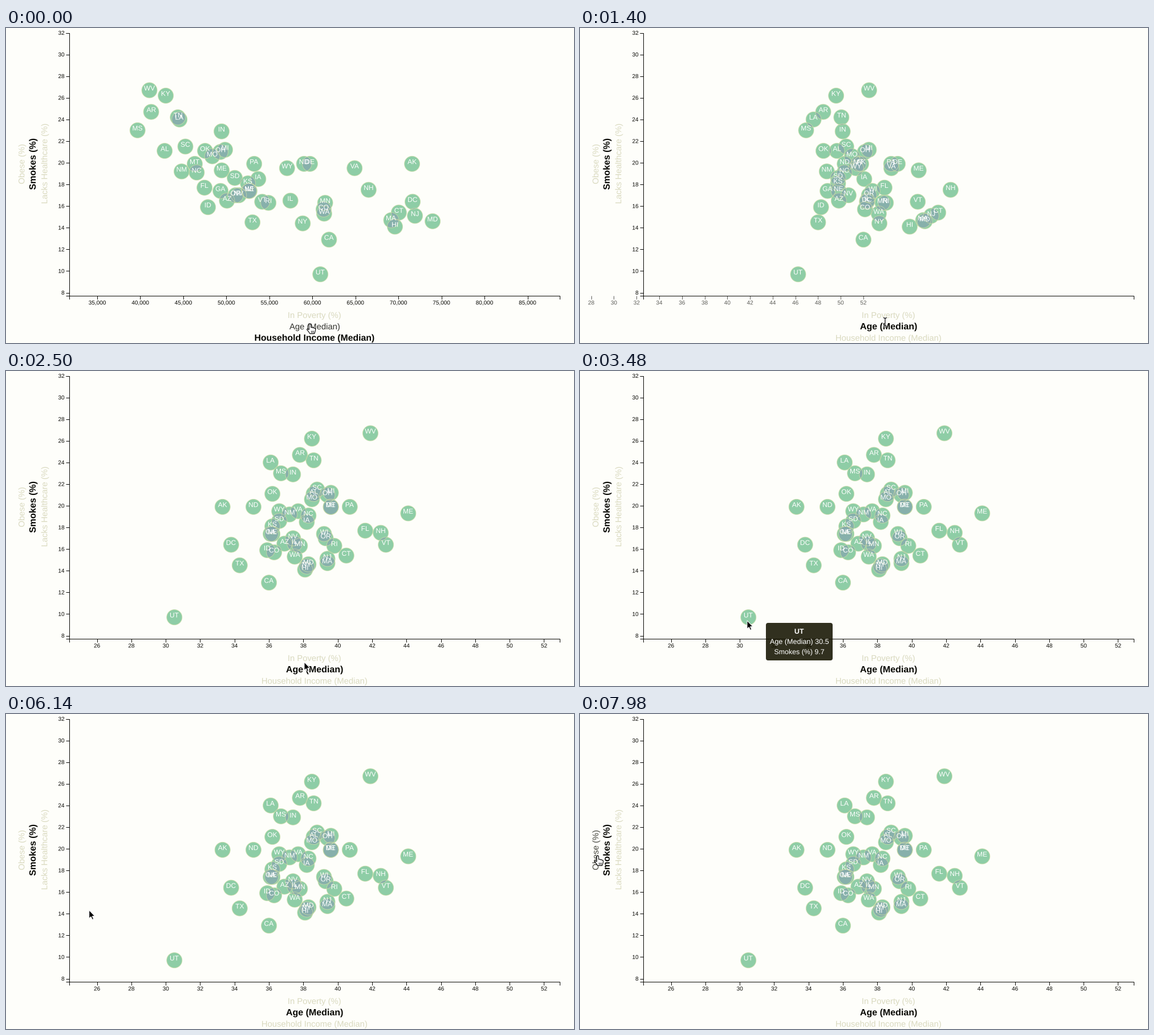
These frames come from a looping animation (996 by 554 pixels, 8 s). A matplotlib script:

```python
import matplotlib.pyplot as plt
import numpy as np
from matplotlib.animation import FuncAnimation
from matplotlib.collections import PolyCollection
from matplotlib.patches import FancyBboxPatch, PathPatch
from matplotlib.path import Path
from matplotlib.textpath import TextPath

W, H, DPI = 996, 554, 64
PX = 72 / DPI
STEP, LOOP = 20, 8000
R = 13.5
INK, FADED, HOVER = (np.array(c) / 255 for c in
                     ((8, 8, 4), (218, 218, 192), (52, 52, 48)))

STATES = ("AL AK AZ AR CA CO CT DE DC FL GA HI ID IL IN IA KS KY LA ME MD MA MI "
          "MN MS MO MT NE NV NH NJ NM NY NC ND OH OK OR PA RI SC SD TN TX UT VT "
          "VA WA WV WI WY").split()
INCOME = np.array([
    42830, 71583, 50068, 41262, 61933, 61303, 70048, 59716, 71648, 47463, 49321,
    69592, 47861, 57444, 49446, 53712, 52504, 42958, 44555, 49462, 73971, 69160,
    49847, 61481, 39680, 48363, 46328, 52686, 51450, 66532, 71919, 44803, 58878,
    46556, 59029, 49308, 47529, 51075, 53234, 54891, 45238, 50979, 44361, 53035,
    60922, 54166, 64902, 61366, 41059, 52622, 57055])
AGE = np.array([
    38.6, 33.3, 36.9, 37.8, 36, 36.3, 40.5, 39.6, 33.8, 41.6, 36.1,
    38.1, 35.9, 37.5, 37.4, 38.2, 36.2, 38.5, 36.1, 44.1, 38.3, 39.4,
    39.6, 37.8, 36.7, 38.5, 39.6, 36.2, 37.4, 42.5, 39.4, 37.2, 38.2,
    38.3, 35.1, 39.4, 36.2, 39.3, 40.7, 39.8, 38.8, 36.6, 38.6, 34.3,
    30.5, 42.8, 37.7, 37.5, 41.9, 39.2, 36.6])
SMOKES = np.array([
    21.1, 19.9, 16.5, 24.7, 12.9, 15.7, 15.4, 19.9, 16.4, 17.7, 17.4,
    14.1, 15.9, 16.5, 22.9, 18.5, 18.1, 26.2, 24, 19.3, 14.6, 14.7,
    21.2, 16.3, 23, 20.6, 19.9, 17.4, 17, 17.5, 15.1, 19.2, 14.4,
    19.1, 19.9, 21, 21.1, 17, 19.9, 16.3, 21.5, 18.6, 24.2, 14.5,
    9.7, 16.4, 19.5, 15.3, 26.7, 17.4, 19.5])


def income_x(v):
    return 235.5 + (np.asarray(v) - 40000) * 0.015089


def age_x(v):
    return 159.6 + (np.asarray(v) - 26) * 30.15


def smokes_y(v):
    return 465.5 - (np.asarray(v) - 8) * 19.04


fig = plt.figure(figsize=(W / DPI, H / DPI), dpi=DPI, facecolor="#fefefa")
ax = fig.add_axes([0, 0, 1, 1])
ax.set_xlim(0, W)
ax.set_ylim(H, 0)
ax.axis("off")
layer = iter(range(1, 1000))


def add_path(path, color, fill=True, width=1.0, edge=None):
    patch = PathPatch(path, facecolor=color if fill else "none",
                      edgecolor=edge or ("none" if fill else color),
                      linewidth=0 if fill and not edge else width * PX,
                      capstyle="butt", zorder=next(layer))
    ax.add_patch(patch)
    return patch


def glyphs(text, size, bold=False, anchor=0.5):
    prop = {"family": "Liberation Sans", "weight": "bold" if bold else "normal"}
    p = TextPath((0, 0), text, size=size, prop=prop)
    v = np.array(p.vertices) * [1, -1]
    ink = v[p.codes != Path.CLOSEPOLY, 0]
    v[:, 0] -= ink.min() + np.ptp(ink) * anchor
    return v, np.array(p.codes)


def add_text(text, x, y, size, color=INK, bold=False, anchor=0.5, upright=False):
    v, codes = glyphs(text, size, bold, anchor)
    if upright:
        v = np.column_stack([v[:, 1], -v[:, 0]])
    patch = add_path(Path(v + [x, y], codes), color)
    patch.set_snap(False)
    return patch


class TextRow:
    """Many short centred strings drawn as one shape."""

    def __init__(self, texts, size, color):
        parts = [glyphs(t, size) for t in texts]
        self.verts = np.concatenate([v for v, _ in parts])
        self.codes = np.concatenate([c for _, c in parts])
        self.owner = np.repeat(np.arange(len(parts)), [len(v) for v, _ in parts])
        self.patch = add_path(Path(self.verts, self.codes), color)
        self.patch.set_snap(False)

    def place(self, x, y):
        at = np.column_stack([x, np.broadcast_to(y, np.shape(x))])
        self.patch.set_path(Path(self.verts + at[self.owner], self.codes))


def segments(starts, ends):
    pts = np.stack([starts, ends], 1).reshape(-1, 2)
    return Path(pts, [Path.MOVETO, Path.LINETO] * len(starts))


# Bubbles
def add_polys(**style):
    polys = PolyCollection([], zorder=next(layer), **style)
    ax.add_collection(polys)
    return polys


fills = add_polys(facecolor="#8ecda6", edgecolor="none", linewidth=0)
lenses = add_polys(facecolor="#86abac", edgecolor="none", linewidth=0, alpha=0.85)
rims = add_polys(facecolor="none", edgecolor="#cfdfa6", linewidth=PX, alpha=0.7)
names = TextRow(STATES, 12, "white")

TURN = np.linspace(0, 2 * np.pi, 48, endpoint=False)
RING = R * np.column_stack([np.cos(TURN), np.sin(TURN)])
SPAN = np.linspace(-1, 1, 16)
PAIRS = np.triu_indices(len(STATES), 1)


def overlaps(pts):
    p, q = pts[PAIRS[0]], pts[PAIRS[1]]
    gap = np.hypot(*(q - p).T)
    near = gap < 2 * R
    p, q, gap = p[near], q[near], gap[near]
    half = np.arccos(gap / (2 * R))[:, None] * SPAN
    aim = np.arctan2(*(q - p).T[::-1])[:, None]

    def arc(c, a):
        return c[:, None] + R * np.stack([np.cos(a), np.sin(a)], -1)
    return np.concatenate([arc(p, aim + half), arc(q, aim + np.pi + half)], 1)


def place_bubbles(e):
    x = income_x(INCOME) * (1 - e) + age_x(AGE) * e
    y = smokes_y(SMOKES)
    pts = np.column_stack([x, y])
    rings = pts[:, None] + RING
    fills.set_verts(rings)
    rims.set_verts(rings)
    lenses.set_verts(overlaps(pts))
    names.place(x, y + 0.3)


# Axes
add_path(Path([(105.5, 8.5), (111.5, 8.5), (111.5, 470.5), (105.5, 470.5)]), INK, False)
add_path(Path([(111.5, 476.5), (111.5, 470.5), (971.5, 470.5), (971.5, 476.5)]), INK, False)
levels = np.arange(8, 33, 2)
rows = smokes_y(levels)
add_path(segments(np.column_stack([0 * rows + 105.5, rows]),
                  np.column_stack([0 * rows + 111.5, rows])), INK, False)
for level, row in zip(levels, rows):
    add_text(str(level), 102.2, row + 3.4, 10, anchor=1)


class Ticks:
    def __init__(self, values, form):
        self.values = values
        self.text = TextRow([form.format(v) for v in values], 10, INK)
        self.marks = add_path(Path([(0, 0), (0, 1)]), INK, False)

    def place(self, e, alpha):
        x = income_x(self.values) * (1 - e) + age_x(self.values) * e
        x = np.clip(x, -300, 1300)
        self.text.place(x, 486.4)
        self.marks.set_path(segments(np.column_stack([x, 0 * x + 470.5]),
                                     np.column_stack([x, 0 * x + 476.5])))
        for patch in (self.text.patch, self.marks):
            patch.set_alpha(alpha)


income_ticks = Ticks(np.arange(35000, 85001, 5000), "{:,}")
age_ticks = Ticks(np.arange(26, 53, 2), "{}")

# Axis titles
SMALL, BIG = 14.8, 16
MID_X, MID_Y = 541, 239.5
add_text("In Poverty (%)", MID_X, 510, SMALL, FADED)
age_off = add_text("Age (Median)", MID_X, 530, SMALL, HOVER)
age_on = add_text("Age (Median)", MID_X, 530, BIG, bold=True)
income_off = add_text("Household Income (Median)", MID_X, 550, SMALL, FADED)
income_on = add_text("Household Income (Median)", MID_X, 550, 15.8, bold=True)
obese = add_text("Obese (%)", 32.3, MID_Y, SMALL, FADED, upright=True)
add_text("Smokes (%)", 52, MID_Y, BIG, bold=True, upright=True)
lacks = add_text("Lacks Healthcare (%)", 72.3, MID_Y - 1, SMALL, FADED, upright=True)

# Tooltip
box = FancyBboxPatch((330, 447), 109, 58, boxstyle="round,pad=4,rounding_size=4",
                     facecolor=(0.08, 0.075, 0), edgecolor="none", linewidth=0,
                     alpha=0.88, zorder=next(layer))
ax.add_patch(box)
tooltip = [box,
           add_text("UT", 384.5, 462, 12.5, "white", bold=True),
           add_text("Age (Median) 30.5", 384.5, 480, 12.6, "white"),
           add_text("Smokes (%) 9.7", 384.5, 498, 12.4, "white")]

# Cursors, each with its hot spot at the origin
HAND = [(-1.6, 1.2), (0, 0), (1.6, 1.2), (1.8, 6.8), (4, 6.4), (5, 7.4), (7, 7.1),
        (8, 8.3), (9.4, 8.6), (9.8, 10), (9.2, 13.5), (7.8, 17.6), (0, 17.6),
        (-2.6, 13.8), (-5.4, 10.4), (-4.6, 9), (-1.6, 10.6)]
CREASES = segments(np.array([(1.8, 12), (4, 12), (6.2, 12)]),
                   np.array([(1.8, 15.5), (4, 15.5), (6.2, 15.5)]))
ARROW = [(0, 0), (0, 14.5), (3.3, 11.5), (5.6, 16.6), (7.9, 15.6), (5.6, 10.6), (10, 10.4)]
BEAM = segments(np.array([(0, -6.5), (-3, -7.5), (0, -6.5), (-3, 7.5), (0, 6.5)]),
                np.array([(0, 6.5), (0, -6.5), (3, -7.5), (0, 6.5), (3, 7.5)]))


def closed(pts):
    return Path(pts + pts[:1], closed=True)


def cursor(*parts):
    return [(path, add_path(path, **style)) for path, style in parts]


cursors = {
    "hand": cursor((closed(HAND), dict(color="white", edge="black", width=1.1)),
                   (CREASES, dict(color="black", fill=False, width=0.8))),
    "beam": cursor((BEAM, dict(color="white", fill=False, width=2.6)),
                   (BEAM, dict(color="black", fill=False, width=1.2))),
    "arrow": cursor((closed(ARROW), dict(color="black", edge="white", width=1.0))),
}

# Cursor path: step, x, y
TRACK = np.array([
    (0, 533, 520), (13, 533, 520), (17, 535, 517), (45, 535, 517), (51, 523, 512),
    (56, 523, 512), (65, 400, 470), (74, 293, 439), (111, 293, 439), (126, 180, 370),
    (140, 84, 300), (147, 70, 287), (151, 59, 277), (160, 34, 258), (171, 31, 249)])
SHAPES = [(0, "hand"), (15, "beam"), (47, "arrow"), (146, "hand"),
          (153, "beam"), (158, "hand")]
CLICK = 13.2


def ease(t):
    t = min(max(t, 0), 1)
    return 4 * t ** 3 if t < 0.5 else 1 - 4 * (1 - t) ** 3


def shade(patch, amount):
    patch.set_facecolor(FADED + (HOVER - FADED) * min(max(amount, 0), 1))


def step_at(ms):
    # Steps last 20, 100 and 20 ms in turn
    turn, rest = divmod(ms, 140)
    return 3 * turn + (rest >= 20) + (rest >= 120)


def draw(k):
    n = step_at(k * STEP)
    e = ease((n - CLICK) / 30)
    place_bubbles(e)
    income_ticks.place(e, 1 - e)
    age_ticks.place(e, e)

    clicked = n >= CLICK
    for patch in (age_on, income_off):
        patch.set_visible(clicked)
    for patch in (age_off, income_on):
        patch.set_visible(not clicked)
    shade(income_off, (25 - n) / 12)
    shade(lacks, min((n - 147) / 8, (163 - n) / 8))
    shade(obese, (n - 162) / 10)

    x, y = (np.interp(n, TRACK[:, 0], TRACK[:, i]) for i in (1, 2))
    over = np.hypot(x - age_x(30.5), y - smokes_y(9.7)) < R
    for part in tooltip:
        part.set_visible(bool(over))
    shape = [s for start, s in SHAPES if n >= start][-1]
    for name, parts in cursors.items():
        for path, patch in parts:
            patch.set_visible(name == shape)
            patch.set_path(Path(path.vertices + [x, y], path.codes))
    return []


def start():
    return draw(0)


anim = FuncAnimation(fig, draw, frames=LOOP // STEP, init_func=start,
                     interval=STEP, repeat=True, repeat_delay=0, blit=False)
plt.show()
```
